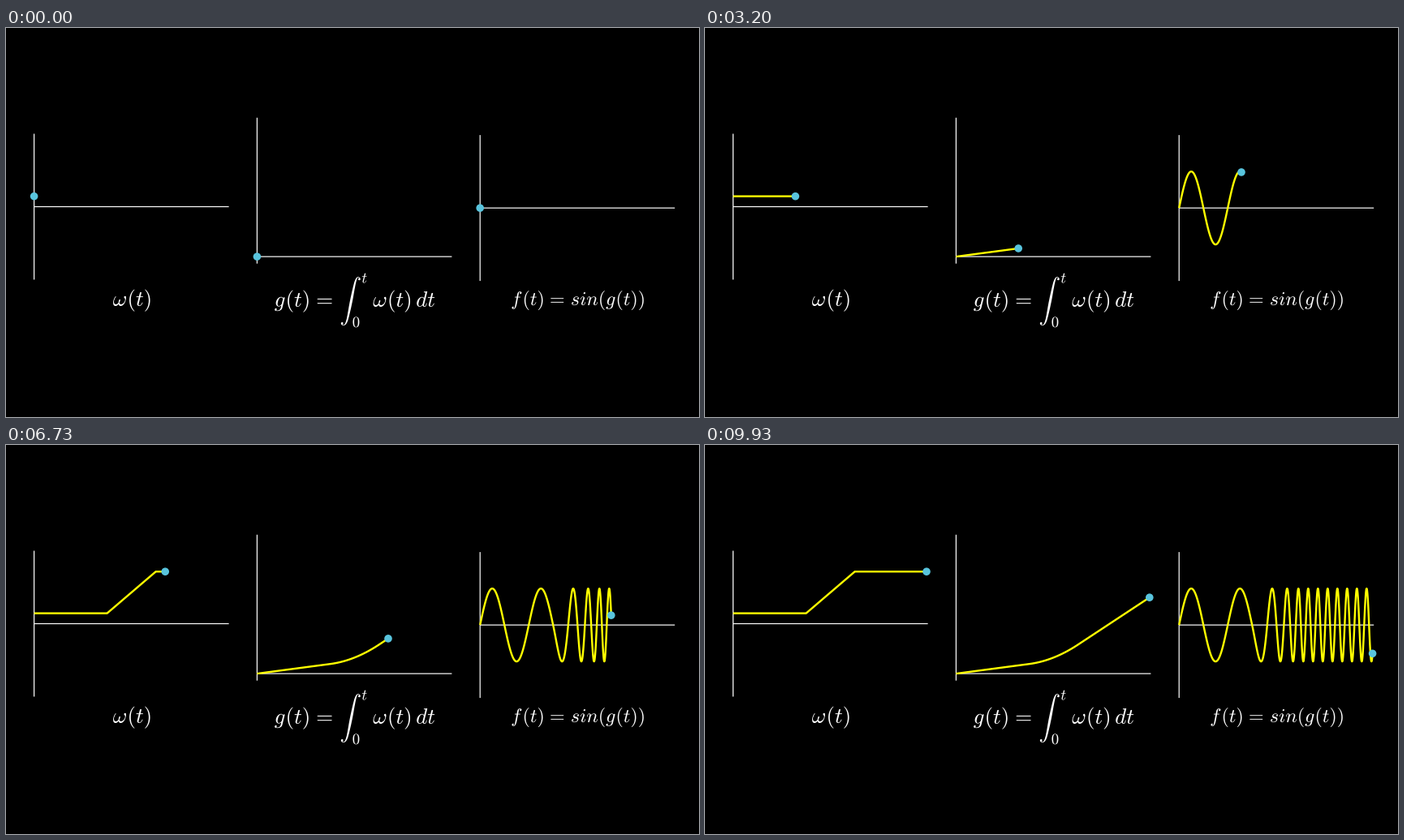
These frames come from a looping animation (854 by 480 pixels, 9990 ms). A matplotlib script:

```python
import numpy as np
import matplotlib as mpl
import matplotlib.pyplot as plt
from matplotlib.animation import FuncAnimation
from matplotlib.patches import Circle, PathPatch
from matplotlib.path import Path
from matplotlib.textpath import TextPath
from matplotlib.transforms import Affine2D

mpl.rcParams["mathtext.fontset"] = "cm"
mpl.rcParams["path.simplify"] = False

W, H, DPI = 854, 480, 64  # a power of two keeps the pixel size exact
FRAMES, FPS = 150, 15
PX = 72 / DPI             # points per pixel
SPEED = 24                # pixels per second along each time axis
WHITE, YELLOW, BLUE = "#ffffff", "#ffff00", "#58c4dd"

fig = plt.figure(figsize=(W / DPI, H / DPI), dpi=DPI, facecolor="black")
ax = fig.add_axes([0, 0, 1, 1])
ax.set_xlim(0, W)
ax.set_ylim(H, 0)
ax.axis("off")


# --- the three functions of time ---

def omega(t):
    return np.interp(t, [3.75, 6.25], [1, 5])


def integral(t):
    ramp = np.clip(t - 3.75, 0, 2.5)
    area = t + 0.8 * ramp**2 + 4 * np.maximum(t - 6.25, 0)
    return area - 0.006 * (omega(t) - 1)


def wave(t):
    return np.sin(0.8 * np.pi * integral(t))


# --- formulas, set with advance widths in em ---

ADVANCE = {
    r"\omega": 0.658, "(": 0.389, ")": 0.389, "t": 0.361, "g": 0.513,
    "f": 0.598, "d": 0.520, "s": 0.469, "i": 0.345, "n": 0.600,
    "=": 1.334, r"\int": 1.513, ",": 0.167,
}


def glyph(symbol, size, x, y):
    path = TextPath((0, 0), f"${symbol}$", size=size)
    return path.transformed(Affine2D().scale(1, -1).translate(x, y))


def integral_sign(size, x):
    """Display integral centred on the math axis, with limits 0 and t."""
    sign = glyph(r"\int", size, x, 0)
    box = sign.get_extents()
    middle = (box.y0 + box.y1) / 2
    sign = sign.transformed(Affine2D().translate(0, -0.25 * size - middle))
    upper = glyph("t", 0.7 * size, x + size, -1.09 * size)
    lower = glyph("0", 0.7 * size, x + 0.57 * size, 0.931 * size)
    return [sign, upper, lower]


def formula(tokens, size, center, baseline):
    parts, x = [], 0
    for token in tokens.split():
        if token == r"\int":
            parts += integral_sign(size, x)
        elif token == "=":
            # mathtext already puts 0.2 em in front of a relation
            parts.append(glyph(token, size, x + 0.078 * size, 0))
        elif token != ",":
            parts.append(glyph(token, size, x, 0))
        x += ADVANCE[token] * size
    path = Path.make_compound_path(*parts)
    box = path.get_extents()
    shift = Affine2D().translate(center - (box.x0 + box.x1) / 2, baseline)
    ax.add_patch(PathPatch(path.transformed(shift), fc=WHITE, lw=0))


# --- graphs ---

class Graph:
    def __init__(self, func, x, y, top, scale):
        self.func, self.x, self.y, self.scale = func, x, y, scale
        style = dict(color=WHITE, lw=1.2 * PX, solid_capstyle="butt",
                     snap=False, zorder=2)
        ax.plot([x, x + 240], [y, y], **style)
        ax.plot([x, x], [top, top + 180], **style)
        self.curve, = ax.plot([], [], color=YELLOW, lw=2.4 * PX, snap=False,
                              solid_capstyle="butt", zorder=3)
        self.dot = ax.add_patch(Circle((x, y), 4.8, fc=BLUE, lw=0, zorder=4))

    def point(self, t):
        return self.x + SPEED * t, self.y - self.scale * self.func(t)

    def update(self, t):
        times = np.append(np.arange(0, t, 0.01), t)
        self.curve.set_data(*self.point(times))
        self.dot.center = self.point(t)


graphs = [
    Graph(omega, 34.6, 220.5, 130.5, 90 / 7),
    Graph(integral, 309.4, 282.1, 110.7, 3.17),
    Graph(wave, 584.2, 222.1, 132.1, 45),
]

formula(r"\omega ( t )", 27, 154.8, 342.9)
formula(r"g ( t ) = \int \omega ( t ) , d t", 27, 429.6, 343.9)
formula("f ( t ) = s i n ( g ( t ) )", 24, 704.6, 342.1)


def draw(frame):
    for graph in graphs:
        graph.update(frame / FPS)
    return []


anim = FuncAnimation(fig, draw, frames=FRAMES, interval=66.6, repeat=True)
plt.show()
```
